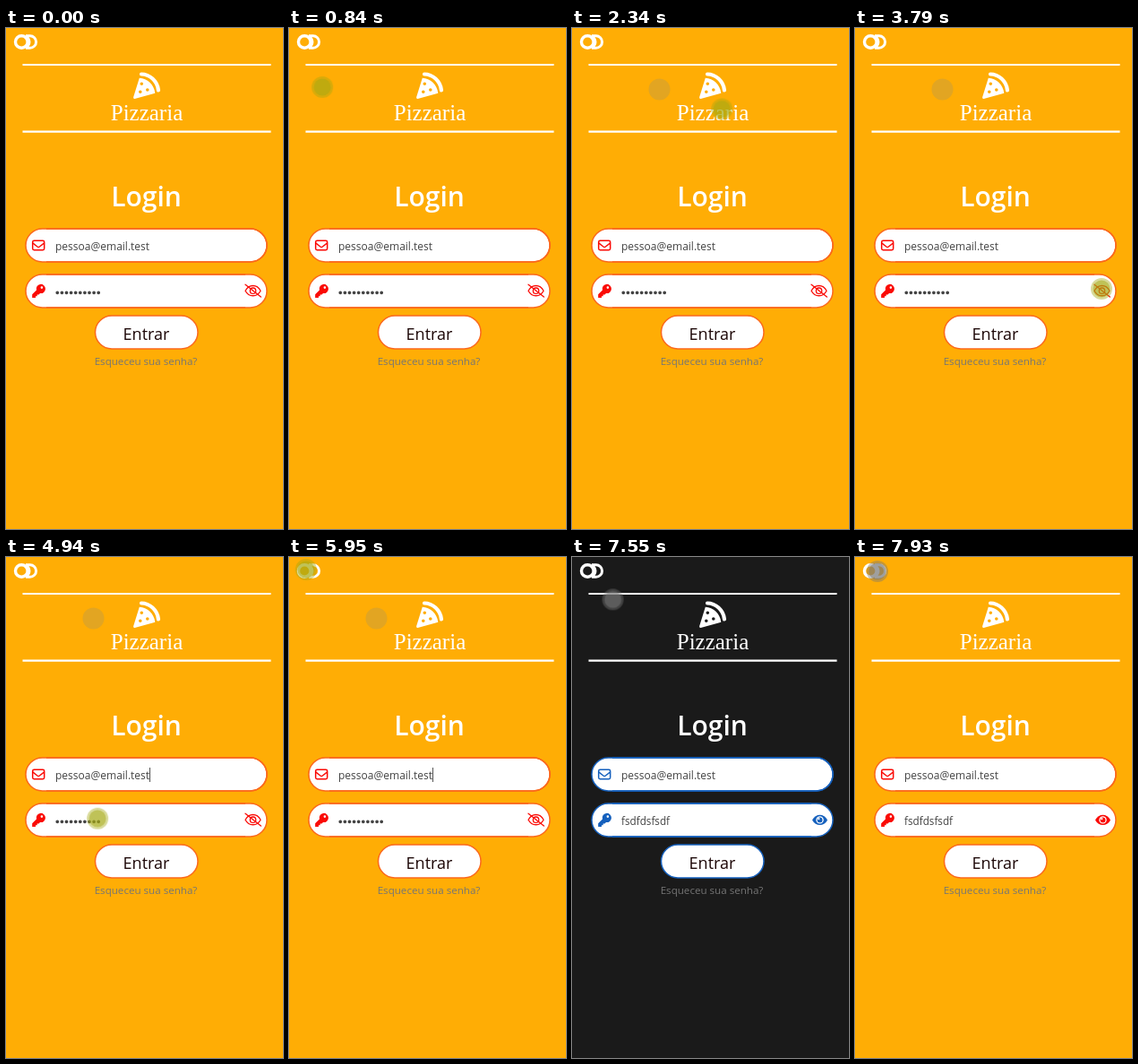
These frames come from a looping animation (309 px wide and 559 px high, 8000 ms). An HTML page:

```html
<!DOCTYPE html>
<html lang="pt">
<head>
<meta charset="utf-8">
<title>Login</title>
<style>
  html, body { margin: 0; width: 100%; height: 100%; overflow: hidden; }
  svg { display: block; width: 100vw; height: 100vh; fill: none; stroke-width: 1.5; }
  svg, .edge, .cursor, .cursor g, .tint, .ghost, .caret, .hidden, .shown {
    animation: 8s linear infinite;
  }
  text { font-family: "Open Sans", "Noto Sans", sans-serif; stroke: none; }
  .mid { text-anchor: middle; }
  .value { font-size: 12px; fill: #444; }
  .white { fill: #fff; }
  .line { stroke: #fff; }
  .icon { stroke: currentColor; stroke-linecap: round; stroke-linejoin: round; }
  .solid { fill: currentColor; stroke: none; }

  svg { animation-name: theme; animation-timing-function: step-end; }
  @keyframes theme {
    0%, 22.125%, 97.25% { background: #ffad05; color: #fa0a05; stroke: #fb681c; }
    15.25%, 76.375% { background: #1a1a1a; color: #1560bd; stroke: #1560bd; }
    100% { background: #ffad05; color: #fa0a05; stroke: #fb681c; }
  }

  /* input borders fade a little after the theme flips */
  .edge { animation-name: edge; }
  @keyframes edge {
    0%, 16.5%, 24%, 77.3%, 99%, 100% { stroke: #fb681c; }
    18.1%, 22.4%, 79%, 97.5% { stroke: #1560bd; }
  }

  .cursor { animation-name: travel; }
  @keyframes travel {
    0%, 1.625% { transform: translate(297px, 529px); }
    11.375% { transform: translate(12px, 21px); }
    12.375% { transform: translate(18px, 18px); }
    16.25% { transform: translate(18px, 15px); }
    22.125% { transform: translate(19px, 15px); }
    27.125% { transform: translate(97px, 68px); }
    29.25% { transform: translate(167px, 90px); }
    31.75% { transform: translate(206px, 193px); }
    37.625%, 39.5% { transform: translate(68px, 242px); }
    43.5% { transform: translate(274px, 289px); }
    47.375%, 53% { transform: translate(275px, 291px); }
    54.875% { transform: translate(260px, 290px); }
    59.75% { transform: translate(58px, 248px); }
    64.625%, 66.75% { transform: translate(165px, 354px); }
    73.4%, 77.25% { transform: translate(19px, 14px); }
    83% { transform: translate(265px, 300px); }
    83.75% { transform: translate(275px, 294px); }
    87.5% { transform: translate(274px, 298px); }
    95.25% { transform: translate(17px, 16px); }
    99%, 100% { transform: translate(25px, 16px); }
  }
  .cursor g { animation-name: appear; animation-timing-function: step-end; }
  @keyframes appear { 0% { opacity: 0; } 1.625%, 100% { opacity: 1; } }
  .tint { animation-name: tint; animation-timing-function: step-end; stroke: none; }
  @keyframes tint {
    0%, 22.125% { fill: #a5aa14; }
    15.25%, 76.375%, 100% { fill: #777; }
  }

  .ghost, .caret, .hidden, .shown { animation-timing-function: step-end; }
  .ghost { animation-name: ghost; fill: #e2a522; stroke: none; }
  @keyframes ghost { 0%, 76.375%, 100% { opacity: 0; } 28.125% { opacity: 1; } }
  .caret { animation-name: caret; stroke: #555; stroke-width: 1; }
  @keyframes caret {
    0%, 66.75%, 76.375%, 100% { opacity: 0; }
    60.5%, 73% { opacity: 1; }
  }
  .hidden { animation-name: hide; }
  .shown { animation-name: show; }
  @keyframes hide { 0%, 47.375% { opacity: 1; } 45.5%, 86.75%, 100% { opacity: 0; } }
  @keyframes show { 0%, 47.375% { opacity: 0; } 45.5%, 86.75%, 100% { opacity: 1; } }
</style>
</head>
<body>
<svg viewBox="0 0 309 559" preserveAspectRatio="none">
  <defs>
    <rect id="field" x="22" y="224" width="269" height="37" rx="18.5"/>
    <clipPath id="emailEdge"><path d="M45 220H295V265H45Z"/></clipPath>
    <clipPath id="passEdge"><path d="M45 220H267V265H45Z"/></clipPath>
  </defs>

  <!-- theme switch -->
  <g class="line" stroke-width="3.4">
    <circle cx="17.3" cy="15.5" r="6.8"/>
    <path d="M22 8.7H26.8A6.8 6.8 0 0 1 26.8 22.3H22M22 8.7Q30 15.5 22 22.3" stroke-width="3"/>
  </g>

  <!-- header -->
  <path class="line" stroke-width="2.2" d="M18.5 41H295.5M18.5 115.7H295.5"/>
  <path class="line" stroke-width="4.2" stroke-linecap="round" d="M151 51.5C160 51.5 169 59 170 69.5"/>
  <path class="white" stroke="none" fill-rule="evenodd"
    d="M148.8 55.8C157.5 56 165.5 63.5 166.3 72.7L143.6 79Q141.8 79.2 142.1 77.3Z
       m.7 6.5a1.8 1.8 0 1 0 3.6 0a1.8 1.8 0 1 0-3.6 0
       m6.5 6.7a1.8 1.8 0 1 0 3.6 0a1.8 1.8 0 1 0-3.6 0
       m-8 2.2a1.8 1.8 0 1 0 3.6 0a1.8 1.8 0 1 0-3.6 0"/>
  <circle class="ghost" cx="97.5" cy="68.5" r="12"/>
  <text class="white mid" x="157" y="103" style="font:25px 'Liberation Serif',serif">Pizzaria</text>
  <text class="white mid" x="156.5" y="199" font-size="30" font-weight="600">Login</text>

  <!-- email -->
  <use href="#field" class="white"/>
  <g clip-path="url(#emailEdge)"><use href="#field" class="edge"/></g>
  <g class="icon">
    <rect x="29.7" y="237.3" width="13" height="10.4" rx="1.6"/>
    <path d="M30 240.2L35 244Q36.2 244.8 37.4 244L42.4 240.2"/>
  </g>
  <text class="value" x="55" y="248">pessoa@email.test</text>
  <path class="caret" d="M160.5 235V251"/>

  <!-- password -->
  <g transform="translate(0 51)">
    <use href="#field" class="white"/>
    <g clip-path="url(#passEdge)"><use href="#field" class="edge"/></g>
  </g>
  <path class="solid" fill-rule="evenodd"
    d="M34 292.5A5.1 5.1 0 1 1 38 296L36.5 297.5H34.7V299.2H33V301H29.2V297.3Z
       M38.6 289.6a1.3 1.3 0 1 0 2.6 0a1.3 1.3 0 1 0-2.6 0"/>
  <g class="hidden">
    <path d="M57.3 295.3H104" stroke="#444" stroke-width="3.8" stroke-linecap="round" stroke-dasharray="0 5.1"/>
    <g class="icon" stroke-width="1.3">
      <path d="M267 293.2C271 285.6 280 285.6 284 293.2C280 300.6 271 300.6 267 293.2Z"/>
      <circle cx="275.5" cy="293.2" r="3.2"/>
      <path d="M267 286.2L284.3 300"/>
    </g>
  </g>
  <g class="shown">
    <text class="value" x="55" y="299" style="font-size:11.7px">fsdfdsfsdf</text>
    <path class="solid" d="M268 293.4C272 285.8 281 285.8 285 293.4C281 301 272 301 268 293.4Z"/>
    <circle class="white" cx="276.5" cy="293.4" r="4.2" stroke="none"/>
    <circle class="solid" cx="276.5" cy="293.4" r="2.9"/>
    <circle class="white" cx="275.3" cy="292.2" r="1.1" stroke="none"/>
  </g>

  <!-- actions -->
  <rect class="white" x="99.5" y="321" width="114.5" height="37" rx="18.5"/>
  <text class="mid" x="156.5" y="348" font-size="18" fill="#1c0606">Entrar</text>
  <text class="mid" x="156" y="376" font-size="11.6" fill="#757575">Esqueceu sua senha?</text>

  <g class="cursor"><g>
    <circle class="tint" r="12" fill-opacity=".42"/>
    <circle class="tint" r="9.5" fill-opacity=".5"/>
  </g></g>
</svg>
</body>
</html>
```
